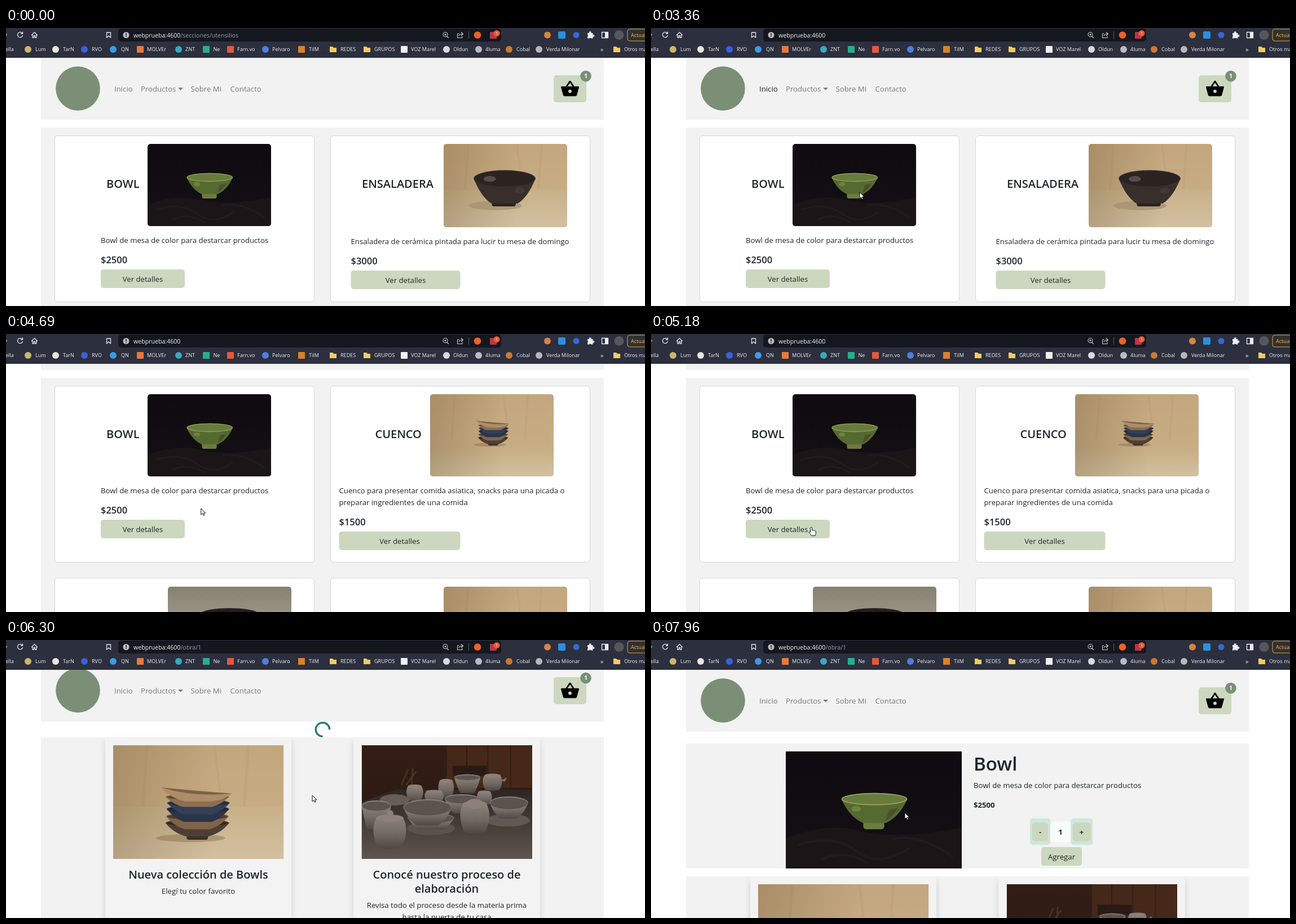
Animation, 1133 px wide and 494 px high, one loop 8 s. Source, as an HTML page:

```html
<!DOCTYPE html>
<html lang="es">
<head>
<meta charset="utf-8">
<title>Tienda de cerámica</title>
<style>
html, body { margin: 0; width: 100%; height: 100%; overflow: hidden; background: #fff; }
svg { display: block; }
text { font-family: "Open Sans", "Noto Sans", sans-serif; white-space: pre; }
</style>
</head>
<body>
<svg id="stage" width="1133" height="494" viewBox="0 0 1133 494"></svg>
<script>
const LOOP = 8000, HOME_CLICK = 1420, LIST_READY = 3420, ITEM_CLICK = 5250, ITEM_READY = 7250;
const INK = '#212529', PANEL = '#f1f2f1', SAGE = '#cbd8bf', MOSS = '#7b8f76', BAR = '#2c2f3d';
const HOST = 'webprueba:4600';

// Drawing helpers
const text = (x, y, s, o = {}) => {
  const size = o.size || 13.2;
  return `<text x="${x}" y="${y + size * .36}" font-size="${size}" fill="${o.fill || INK}" font-weight="${o.weight || 400}" text-anchor="${o.anchor || 'start'}" ${o.id ? `id="${o.id}"` : ''}>${s}</text>`;
};
const mid = (x, y, s, o = {}) => text(x, y, s, { ...o, anchor: 'middle' });
const rect = (x, y, w, h, fill, rx = 0, more = '') =>
  `<rect x="${x}" y="${y}" width="${w}" height="${h}" rx="${rx}" fill="${fill}" ${more}/>`;
const disc = (x, y, r, fill) => `<circle cx="${x}" cy="${y}" r="${r}" fill="${fill}"/>`;
const oval = (x, y, rx, ry, fill, more = '') =>
  `<ellipse cx="${x}" cy="${y}" rx="${rx}" ry="${ry}" fill="${fill}" ${more}/>`;
const path = (d, fill, more = '') => `<path d="${d}" fill="${fill}" ${more}/>`;
const line = (d, color = '#e6e8ee', w = 1.3) =>
  path(d, 'none', `stroke="${color}" stroke-width="${w}" stroke-linecap="round" stroke-linejoin="round"`);
const button = (x, y, w, h, s) => rect(x, y, w, h, SAGE, 5) + mid(x + w / 2, y + h / 2 + .5, s);
const group = (id, body) => `<g id="${id}">${body}</g>`;
const shade = (id, ...stops) => `<linearGradient id="${id}" x2="0" y2="1">${stops.map((c, i) =>
  `<stop offset="${i / (stops.length - 1)}" stop-color="${c}"/>`).join('')}</linearGradient>`;

let clips = 0;
const photo = (id, x, y, w, h, r = 0) => {
  const c = 'clip' + clips++;
  return `<clipPath id="${c}">${rect(x, y, w, h, '#000', r)}</clipPath>` +
    `<g clip-path="url(#${c})"><use href="#${id}" x="${x}" y="${y}" width="${w}" height="${h}"/></g>`;
};

// Photographs in a 300 x 200 space
const bowl = (x, y, rx, ry, depth, foot, body, inner) =>
  path(`M${x - rx} ${y}Q${x - rx * .76} ${y + depth * .74} ${x - foot} ${y + depth}H${x + foot}Q${x + rx * .76} ${y + depth * .74} ${x + rx} ${y}Z`, body) +
  oval(x, y, rx, ry, body) + oval(x, y + .5, rx - 2, ry - 1.5, inner);
const jar = (x, y, w, h) =>
  path(`M${x + w * .12} ${y + h * .15}Q${x - w * .08} ${y + h * .45} ${x + w * .15} ${y + h * .95}Q${x + w / 2} ${y + h * 1.05} ${x + w * .85} ${y + h * .95}Q${x + w * 1.08} ${y + h * .45} ${x + w * .88} ${y + h * .15}Z`, 'url(#clay)') +
  oval(x + w / 2, y + h * .16, w * .4, h * .1, '#a0968d');
const dish = (x, y, rx, ry, depth, foot) => bowl(x, y, rx, ry, depth, foot, 'url(#clay)', '#6a615b');
const cloth = floor => rect(0, 0, 300, 200, 'url(#wall)') +
  path('M60 0L52 110M178 0L190 100M238 0L230 110', 'none', 'stroke="#b0946a" stroke-width="5" opacity=".25"') +
  rect(0, floor, 300, 200 - floor, 'url(#table)') + rect(0, 0, 300, 200, 'url(#side)');
const stack = (x, y, k) => `<g transform="translate(${x} ${y}) scale(${k})">` +
  oval(-12, 86, 62, 7, '#8d7250', 'opacity=".5"') + rect(-19, 76, 38, 13, '#3f3027', 4) +
  bowl(0, 59, 57, 7, 24, 20, '#4d3f35', '#352b25') + bowl(0, 47, 56, 7, 23, 22, '#80644a', '#4f3d30') +
  bowl(1, 34, 56, 7, 23, 24, '#2b3448', '#1f2737') + bowl(2, 23, 56, 7, 21, 24, '#343f58', '#252f43') +
  bowl(0, 12, 57, 6, 18, 26, '#8d6f51', '#5d4836') +
  path('M-65 -5Q-48 14 -22 20H25Q50 17 62 6Z', '#ad8d67') + path('M-65 -5Q0 2 62 6Q-6 13 -65 -5Z', '#7c6048') + '</g>';
const salad = cloth(110) + oval(125, 148, 65, 11, '#a48d6b', 'opacity=".7"') +
  rect(117, 138, 58, 12, '#2b2321', 5) + bowl(148, 83, 75, 20, 60, 32, '#382e2b', '#2a2322') +
  oval(112, 84, 15, 7, '#8b8380', 'opacity=".45"') + oval(185, 112, 12, 8, '#5d4c44', 'opacity=".35"');
const photos = {
  green: rect(0, 0, 300, 200, 'url(#night)') +
    path('M0 148Q70 120 130 136T300 130V200H0Z', '#1b1518') +
    path('M20 160Q80 140 120 170T210 165M180 150Q230 140 285 180M60 185Q100 165 140 192', 'none', 'stroke="#251e21" stroke-width="4" opacity=".7"') +
    rect(132, 116, 36, 17, '#6d7a42', 5) + bowl(151, 82, 56, 11, 40, 20, '#546a30', '#667c3c') +
    oval(151, 81.5, 55, 9.5, 'none', 'stroke="#929c58" stroke-width="2"') +
    path('M176 100Q186 98 192 96Q184 110 170 119Z', '#4c4427', 'opacity=".7"') + oval(120, 98, 8, 5, '#849a4e', 'opacity=".5"'),
  salad,
  dusk: rect(0, 0, 300, 200, 'url(#grey)') + bowl(150, 66, 70, 14, 70, 34, '#30282a', '#211c1e'),
  tower: cloth(140) + stack(153, 68, .64),
  spread: cloth(108) + stack(148, 79, .98),
  studio: rect(0, 0, 300, 200, 'url(#wood)') + rect(150, 0, 150, 75, '#4f2f1d') +
    path('M185 0V75M222 0V75M262 0V75', 'none', 'stroke="#3a2216" stroke-width="2"') +
    path('M70 70L82 42M78 70L96 46M88 70L90 40', 'none', 'stroke="#54392a" stroke-width="3"') +
    rect(160, 36, 60, 18, '#2f1e18') + path('M0 100L60 78H300V200H0Z', 'url(#bench)') +
    dish(186, 56, 23, 5, 28, 12) + jar(212, 48, 36, 32) + path('M244 62L256 56L252 64Z', '#8a8179') +
    jar(134, 57, 29, 36) + jar(78, 67, 31, 32) + oval(58, 96, 26, 10, '#756c66') + jar(110, 77, 35, 26) +
    dish(176, 94, 30, 8, 26, 14) + jar(202, 78, 28, 27) + dish(26, 106, 26, 9, 42, 17) +
    oval(257, 132, 39, 11, '#6f6660') + dish(259, 101, 34, 11, 28, 14) +
    oval(122, 146, 42, 12, '#675f59') + dish(122, 128, 41, 9, 20, 24) + dish(116, 109, 43, 14, 32, 19) +
    jar(19, 118, 61, 64) + disc(50, 120, 6, '#a0968d') + jar(172, 94, 54, 61) + oval(199, 103, 15, 9, '#a0968d') +
    rect(0, 0, 300, 200, '#0a0604', 0, 'opacity=".14"')
};
const defs = `<defs>${shade('night', '#0e0a10', '#151014')}${shade('wall', '#c3a67d', '#cbb289')}${shade('table', '#c8b189', '#d2c0a0')}
${shade('grey', '#878071', '#c4bcae')}${shade('wood', '#3b2219', '#2b1a15')}${shade('bench', '#352c28', '#50463f', '#6d635c')}${shade('clay', '#9f968d', '#847b74', '#5c534d')}
<linearGradient id="side"><stop offset="0" stop-color="#4a3418" stop-opacity=".22"/><stop offset=".6" stop-color="#4a3418" stop-opacity="0"/></linearGradient>
<filter id="drop" x="-20%" y="-20%" width="140%" height="140%"><feDropShadow dx="0" dy="7" stdDeviation="6" flood-opacity=".15"/></filter>
${Object.entries(photos).map(([id, body]) => `<symbol id="${id}" viewBox="0 0 300 200" preserveAspectRatio="none">${body}</symbol>`).join('')}</defs>`;

// Page parts
const basket = 'M17.2 9L12.8 2.4Q12 1.7 11.2 2.4L6.8 9H2Q1 9 1 10L3.6 19.5Q4 21 5.5 21H18.5Q20 21 20.4 19.5L23 10Q23 9 22 9ZM9 9L12 4.6L15 9ZM12 17A2 2 0 1 1 12 13A2 2 0 1 1 12 17Z';
const soft = { fill: '#787a79' };
const header = rect(62, 53, 998, 110, PANEL) + disc(127.5, 107.5, 39.3, MOSS) +
  text(192, 108.5, 'Inicio', { ...soft, id: 'home' }) + text(239, 108.5, 'Productos', soft) +
  path('M305 106H314L309.5 110.5Z', soft.fill) +
  text(327.5, 108.5, 'Sobre Mi', soft) + text(397.5, 108.5, 'Contacto', soft) +
  rect(971, 84, 58, 48, SAGE, 5) + path(basket, '#000', 'transform="translate(982.5 90.5) scale(1.46)"') +
  disc(1028, 85.5, 9.8, MOSS) + mid(1028, 85.5, '1', { size: 10.5, weight: 700, fill: '#fff' });

const frame = (x, y, h) => rect(x + .5, y + .5, 460, h, '#fff', 5, 'stroke="#d5d7d7"');
function product(c) {
  return frame(c.card, 191, c.h) + text(c.title, c.y + 70.5, c.name, { size: 20, weight: 600 }) +
    photo(c.pic, c.img, c.y, 219, c.ph, 5) +
    c.lines.map((s, i) => text(c.x, c.y + c.ph + 25.5 + i * 21, s)).join('') +
    text(c.x, c.price, c.cost, { size: 16.5, weight: 600 }) + button(c.x, c.price + 16.5, c.bw, 33, 'Ver detalles');
}
const first = h => product({ card: 86, h, title: 178, y: 206, name: 'BOWL', pic: 'green', img: 251, ph: 146, x: 168,
  lines: ['Bowl de mesa de color para destarcar productos'], price: 412.5, cost: '$2500', bw: 149 });
const category = rect(62, 177, 998, 420, PANEL) + first(295) +
  product({ card: 575, h: 295, title: 631, y: 206, name: 'ENSALADERA', pic: 'salad', img: 776, ph: 148, x: 611.5,
    lines: ['Ensaladera de cerámica pintada para lucir tu mesa de domingo'], price: 414.5, cost: '$3000', bw: 194 });
const listing = rect(62, 177, 998, 900, PANEL) + first(313) +
  product({ card: 575, h: 313, title: 654.5, y: 206, name: 'CUENCO', pic: 'tower', img: 752, ph: 146, x: 590.5,
    lines: ['Cuenco para presentar comida asiatica, snacks para una picada o', 'preparar ingredientes de una comida'],
    price: 433.5, cost: '$1500', bw: 215 }) +
  frame(86, 532.5, 313) + photo('dusk', 287, 548, 219, 146, 5) +
  frame(575, 532.5, 313) + photo('salad', 776, 548, 219, 148, 5);

function promo(x, pic, title, sub) {
  const cx = x + 165, drop = (title.length - 1) * 25;
  return rect(x, 0, 330, 405, '#f3f3f3', 5, 'filter="url(#drop)"') + photo(pic, x + 14, 14, 302.5, 202) +
    title.map((s, i) => mid(cx, 243.5 + i * 25, s, { size: 20, weight: 600 })).join('') +
    sub.map((s, i) => mid(cx, 273 + drop + i * 21, s)).join('') + button(cx - 36, 343.5, 72, 33, 'Ver Más');
}
const promos = rect(62, 0, 998, 700, PANEL) +
  promo(176, 'spread', ['Nueva colección de Bowls'], ['Elegí tu color favorito']) +
  promo(616.5, 'studio', ['Conocé nuestro proceso de', 'elaboración'],
    ['Revisa todo el proceso desde la materia prima', 'hasta la puerta de tu casa']);
const detail = rect(62, 184, 998, 222, PANEL) + photo('green', 239, 198, 312, 208) +
  text(572, 220.5, 'Bowl', { size: 33, weight: 600 }) + text(572, 258.5, 'Bowl de mesa de color para destarcar productos') +
  text(572, 293, '$2500', { weight: 700 }) +
  rect(672, 317, 36, 47, '#cfe7dd', 5) + rect(744, 317, 39, 47, '#cfe7dd', 5) + rect(708, 322.5, 36, 37, '#f9fafa', 5) +
  rect(675.5, 324.5, 29, 33, SAGE, 5) + rect(747.5, 324.5, 33, 33, SAGE, 5) +
  [[690, '-'], [726, '1'], [763.5, '+']].map(([x, s]) => mid(x, 341.5, s, { weight: 700 })).join('') +
  button(692, 368, 72, 33, 'Agregar');
const spinner = path('M8.66 8.66A12.25 12.25 0 1 1 8.66 -8.66', 'none', 'stroke="#2a7f60" stroke-width="3.4"');

// Browser bar: icon x, label x, label, icon colour (square when marked)
const marks = [
  [39, 52, 'Lum', '#cdb56c'], [88, 101, 'TarN', '#e9e6da'], [139, 152, 'RVO', '#3861e0'], [190, 204, 'QN', '#3b9be8'],
  [238, 250, 'MOLVEr', '#e8793d', 1], [306, 318, 'ZNT', '#38a9bd'], [355, 367.5, 'Ne', '#27ae8f', 1],
  [398, 410, 'Farn.vo', '#e2583e', 1], [460, 472, 'Pelvaro', '#4d7fe0'], [524, 537, 'TilM', '#d9822b', 1],
  [580, 593, 'REDES', 0], [640, 653, 'GRUPOS', 0], [706, 718, 'VOZ Marel', '#f0f0f0', 1], [781, 793, 'Oldun', '#d8dae0'],
  [838, 850, '4luma', '#b9bcc8'], [892, 905, 'Cobal', '#c97a32'], [945, 958, 'Verda Milonar', '#b5b8ba'], [1083, 1096, 'Otros marcadores', 0]
];
const folder = x => path(`M${x - 6} 33H${x - 1}L${x + 1} 35H${x + 6}V43H${x - 6}Z`, '#f3cb63');
const pale = { size: 9.1, fill: '#eef0f4' };
const chrome = rect(0, 0, 1133, 53, BAR) + rect(199, 1, 679, 23, '#15171f', 5) +
  line('M-2 9L2 12L-2 15', '#8a8d98') + line('M29 9.5A4.6 4.6 0 1 0 29.5 13.5M29.5 7V10H26.5') +
  line('M45.5 12.5L50.5 7.5L55.5 12.5M47 12V17H49.5V13.5H51.5V17H54V12') + line('M178.5 8H185.5V17L182 14L178.5 17Z') +
  disc(213, 12.5, 5.5, '#b9bcc4') + rect(212.3, 9, 1.5, 4.5, '#15171f') + rect(212.3, 14.5, 1.5, 1.5, '#15171f') +
  `<text x="226" y="16.5" font-size="10.6" fill="#f1f2f5">${HOST}<tspan id="route" fill="#9a9da8"></tspan></text>` +
  line('M781.5 14.5L784.5 17.5M777.5 11.5H780.5M779 10V13M783 11.5A4 4 0 1 0 775 11.5A4 4 0 1 0 783 11.5', '#c8cad2', 1.1) +
  line('M803 10H800.5V17.5H809V14.5M803 14Q804 10.5 809 10.5M807 7.5L810.5 10.5L807 13.5', '#c8cad2', 1.1) +
  rect(820, 6, 1, 13, '#5b5e69') + disc(836, 12.5, 6.3, '#f0602a') + rect(858, 7, 12, 12, '#b8344f', 1) +
  disc(870, 9.5, 5.5, '#ee5a2a') + mid(870, 9.5, '1', { size: 7, fill: '#fff' }) +
  disc(960, 12.5, 6, '#d98440') + rect(979, 6, 13, 13, '#2d8fe0', 2) + disc(1011, 12.5, 5.5, '#3568d8') +
  path('M1031 9H1034A2 2 0 1 1 1037.5 9H1040.5V12A2 2 0 1 1 1040.5 15.5V18.5H1037.5A2 2 0 0 0 1034 18.5H1031V15.5A2 2 0 0 0 1031 12Z', '#eceef2') +
  line('M1056.5 7.5H1067.5V17.5H1056.5Z', '#eceef2') + rect(1062, 8, 5.5, 9.5, '#eceef2') +
  disc(1087, 12.5, 8.5, '#55585a') +
  rect(1102, 2, 60, 21, '#33302f', 4, 'stroke="#d8a545"') + text(1108, 12.5, 'Actualizar', { size: 9.1, fill: '#f0bd5e' }) +
  text(-1, 38, 'ella', pale) + text(1054, 38, '»', { size: 11, fill: '#eef0f4' }) +
  marks.map(([x, tx, s, c, sq]) => (!c ? folder(x) : sq ? rect(x - 6, 32, 12, 12, c, 1) : disc(x, 38, 6, c)) + text(tx, 38, s, pale)).join('');

const edge = 'stroke="#111" stroke-width="1" stroke-linejoin="round"';
const pointers = {
  arrow: path('M0 0V11L2.6 8.7L4.4 12.4L6.2 11.5L4.5 8H8Z', '#fff', edge),
  hand: path('M-1.5 8V1.2Q0 -1 1.5 1.2V6Q3 4.6 4.2 6.3Q5.6 5.2 6.6 6.8Q8.3 6.3 8.3 8V11.5Q7.5 13 7 15.5H.5Q-1 12.5 -4 9.5Q-3.8 7.5 -1.5 9.5Z', '#fff', edge),
  beam: line('M-2 -5H2M0 -5V5M-2 5H2', '#222', 1)
};

const stage = document.getElementById('stage');
stage.innerHTML = defs + rect(0, 0, 1133, 494, '#fff') +
  group('page', group('top', header) + group('category', category) + group('listing', listing) +
    group('detail', detail) + group('promos', promos) + group('spinner', spinner)) +
  chrome + group('cursor', Object.entries(pointers).map(([id, body]) => group(id, body)).join(''));
const el = id => document.getElementById(id);
const show = (id, on) => { el(id).style.display = on ? '' : 'none'; };

// Motion: [time, value...]
const scrollKeys = [[3820, 0], [3980, 62], [4230, 99], [ITEM_CLICK, 99], [ITEM_CLICK, 109], [5860, 109], [6100, 60], [6300, 18], [6520, 0]];
const cursorKeys = [
  [70, 1044, 482], [300, 800, 330], [580, 380, 160], [810, 195, 106], [950, 167, 107], [1150, 141, 113], [HOME_CLICK, 141, 113],
  [1620, 222, 126], [1800, 310, 162], [2180, 400, 250], [2450, 399, 258], [2750, 350, 310], [3090, 370, 292], [3820, 370, 292],
  [4230, 346, 310], [4690, 346, 310], [4980, 284, 343], [ITEM_CLICK, 284, 343], [5530, 329, 311], [5860, 329, 311],
  [6300, 543, 276], [6700, 560, 262], [7210, 520, 280], [7800, 450, 307]
];
const looks = [[0, 'arrow'], [800, 'hand'], [1560, 'arrow'], [4920, 'hand'], [ITEM_CLICK + 60, 'arrow'], [5500, 'beam'], [5900, 'arrow']];

function sample(keys, t) {
  const n = keys.findIndex(k => k[0] > t);
  if (n === 0) return keys[0].slice(1);
  if (n < 0) return keys[keys.length - 1].slice(1);
  const a = keys[n - 1], b = keys[n], p = (t - a[0]) / (b[0] - a[0]);
  return a.slice(1).map((v, i) => v + (b[i + 1] - v) * p);
}

function draw(t) {
  const onItem = t >= ITEM_CLICK, ready = t >= ITEM_READY, atHome = t >= HOME_CLICK && !onItem;
  const [scroll] = sample(scrollKeys, t), [x, y] = sample(cursorKeys, t);
  show('category', t < LIST_READY);
  show('listing', t >= LIST_READY && !onItem);
  show('detail', ready);
  show('promos', onItem);
  show('spinner', onItem && !ready);
  el('page').setAttribute('transform', `translate(0 ${-scroll})`);
  el('promos').setAttribute('transform', `translate(0 ${ready ? 420 : 191})`);
  el('spinner').setAttribute('transform', `translate(561.5 177) rotate(${45 + .48 * (t - 6300)})`);
  el('home').setAttribute('fill', atHome ? '#1d1f1e' : soft.fill);
  el('route').textContent = onItem ? '/obra/1' : atHome ? '' : '/secciones/utensilios';
  const look = looks.filter(k => k[0] <= t).pop()[1];
  Object.keys(pointers).forEach(id => show(id, id === look));
  show('cursor', t >= 70);
  el('cursor').setAttribute('transform', `translate(${x} ${y})`);
}

const start = performance.now();
function tick() {
  draw((performance.now() - start) % LOOP);
  requestAnimationFrame(tick);
}
tick();
</script>
</body>
</html>
```
